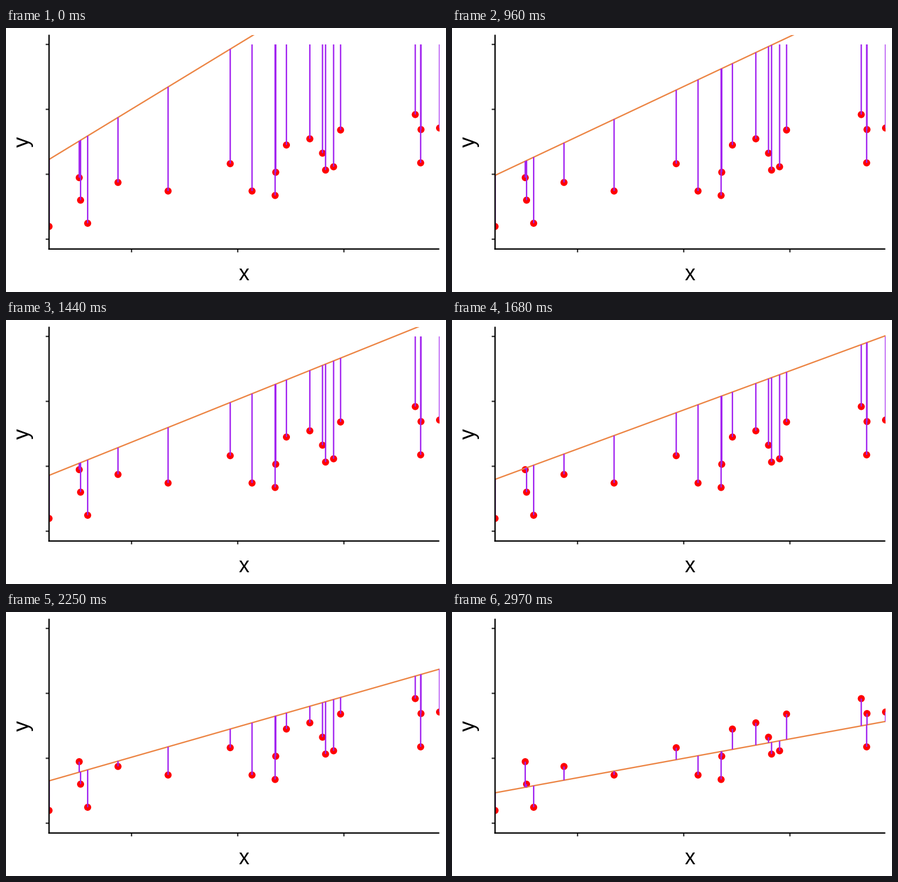
These frames come from a looping animation (750 px wide and 450 px high, 3000 ms). A matplotlib script:

```python
import numpy as np
import matplotlib.pyplot as plt
from matplotlib.animation import FuncAnimation
from matplotlib.collections import LineCollection
from matplotlib.patches import Circle, Rectangle

W, H, DPI = 750, 450, 100
FRAMES, STEP = 100, 30
LEFT, RIGHT, TOP, BOTTOM = 73.4, 739, 11.5, 376.7
CEILING = 28          # residuals never rise above the top tick
PX = 72 / DPI         # points per pixel
STROKE = 2.3 * PX

POINTS = np.array([
    (73.4, 338.3), (124.8, 255.1), (127.1, 293.5), (139.2, 332.9),
    (190.9, 263.3), (276.3, 277.9), (382.2, 231.3), (419.4, 277.9),
    (458.7, 285.5), (459.8, 245.9), (478.0, 199.5), (517.9, 188.9),
    (539.5, 213.4), (544.7, 242.2), (558.4, 236.6), (570.3, 173.9),
    (697.6, 147.6), (706.8, 229.9), (707.4, 173.1), (739.0, 170.5),
])
XS, YS = POINTS.T

fig = plt.figure(figsize=(W / DPI, H / DPI), dpi=DPI, facecolor="white")
ax = fig.add_axes([0, 0, 1, 1])
ax.set(xlim=(0, W), ylim=(H, 0))
ax.axis("off")

panel = Rectangle((LEFT, TOP), RIGHT - LEFT, BOTTOM - TOP, visible=False)
ax.add_patch(panel)


def stroke(xs, ys, color, z):
    line, = ax.plot(xs, ys, color=color, lw=STROKE, zorder=z,
                    solid_capstyle="butt", snap=False)
    return line


def label(x, y, text, rotation=0):
    ax.text(x, y, text, family="Liberation Sans", size=36 * PX, color="black",
            ha="center", va="baseline", rotation=rotation,
            rotation_mode="anchor")


for x, y in POINTS:
    dot = Circle((x, y), 6, facecolor="red", edgecolor="none", zorder=2)
    ax.add_patch(dot)
    dot.set_clip_path(panel)

fit = stroke([], [], "#ec8443", 3)
fit.set_clip_path(panel)
residuals = LineCollection([], colors="#a020f0", linewidths=STROKE, zorder=4)
residuals.set_snap(False)
ax.add_collection(residuals, autolim=False)
residuals.set_clip_path(panel)

for y in np.linspace(28, 360, 4):
    stroke([67.7, LEFT], [y, y], "#333333", 5)
for x in (214, 395, 576):
    stroke([x, x], [BOTTOM, 382.4], "#333333", 5)
stroke([LEFT, LEFT], [TOP, BOTTOM + 1.1], "black", 6)
stroke([LEFT - 1.1, 738.6], [BOTTOM, BOTTOM], "black", 6)
label(405.5, 430, "x")
label(38.8, 194.3, "y", 90)


def update(i):
    t = i / (FRAMES - 1)
    start = 224 + 84.2 * t
    slope = -0.609 + 0.4262 * t

    def on_line(x):
        return start + slope * (x - LEFT)

    ends = np.array([LEFT, RIGHT])
    fit.set_data(ends, on_line(ends))
    tops = np.maximum(on_line(XS), CEILING)
    residuals.set_segments([[(x, y), (x, top)]
                            for x, y, top in zip(XS, YS, tops)])
    return fit, residuals


anim = FuncAnimation(fig, update, frames=FRAMES, interval=STEP,
                     init_func=lambda: update(0), repeat=True, repeat_delay=0)
plt.show()
```
